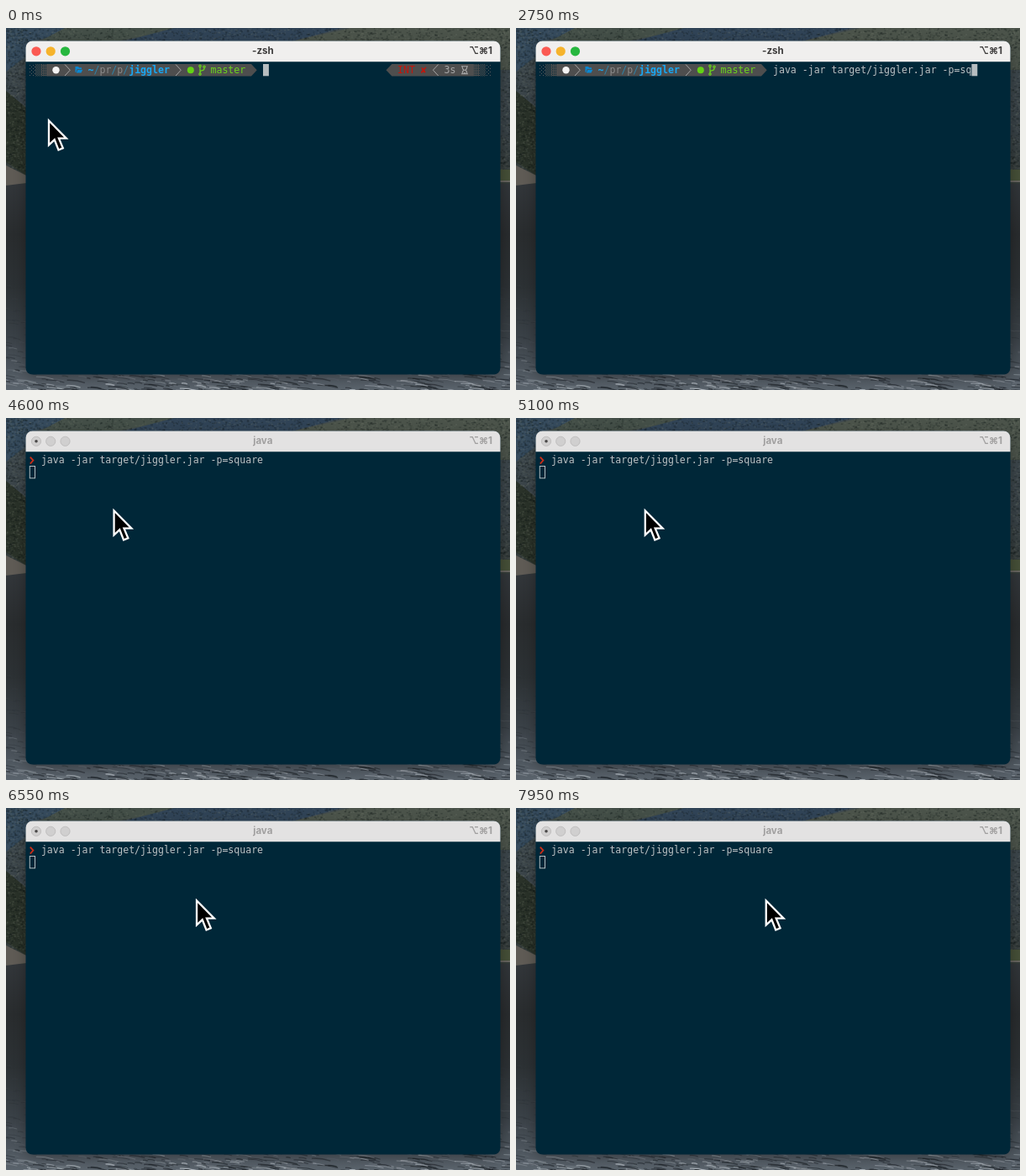
Write an HTML page with a canvas that moves like this. It is 600 by 432 pixels and loops after 8000 ms.

```html
<!DOCTYPE html>
<html lang="en">
<head>
<meta charset="utf-8">
<title>Terminal session</title>
<style>
  html, body { margin: 0; width: 100%; height: 100%; overflow: hidden; background: #2b3032; }
  canvas, svg { position: absolute; left: 0; top: 0; width: 600px; height: 432px; }
  .mono { font: 11.55px "DejaVu Sans Mono", monospace; white-space: pre; }
  .bold { font-weight: 700; }
  .title { font: 700 11.5px Inter, sans-serif; text-anchor: middle; }
  .keys { font: 700 11.5px Inter, "DejaVu Sans", sans-serif; text-anchor: end; }
  .bar { fill: #f0efee; }
  .title, .keys { fill: #3b3a3a; }
  .idle .bar { fill: #e3e2e2; }
  .idle .title, .idle .keys { fill: #a09f9f; }
  .idle .light { fill: #d0cfcf; stroke: #b9b8b8; stroke-width: .8; }
  .dot { display: none; fill: #4a4949; }
  .idle .dot { display: inline; }
  .thin { fill: none; stroke: #a3a3a3; stroke-width: 1; }
  .shadow { filter: blur(8px); }
</style>
</head>
<body>
<canvas id="lake" width="600" height="432"></canvas>
<svg viewBox="0 0 600 432">
  <defs>
    <pattern id="light" width="4" height="4" patternUnits="userSpaceOnUse">
      <path d="M0 0h1v1h-1zM2 2h1v1h-1z" fill="#5a5c5d"/>
    </pattern>
    <pattern id="medium" width="2" height="2" patternUnits="userSpaceOnUse">
      <path d="M0 0h1v1h-1zM1 1h1v1h-1z" fill="#4e4e4e"/>
    </pattern>
    <pattern id="dark" width="2" height="2" patternUnits="userSpaceOnUse">
      <path d="M0 0h2v1h-1v1h-1z" fill="#4e4e4e"/>
    </pattern>
  </defs>

  <g id="window">
    <rect class="shadow" x="24" y="22" width="565" height="394" rx="10" fill="#000" opacity=".32"/>
    <rect x="23.5" y="15.5" width="565" height="398" rx="8" fill="#002738"/>
    <path class="bar" d="M23.5 40.2V23.5a8 8 0 0 1 8-8h549a8 8 0 0 1 8 8V40.2z"/>
    <circle class="light" cx="36" cy="27.8" r="5.6" fill="#fb5a52"/>
    <circle class="light" cx="53.2" cy="27.8" r="5.6" fill="#f6b32c"/>
    <circle class="light" cx="70.5" cy="27.8" r="5.6" fill="#27b73f"/>
    <circle class="dot" cx="36" cy="27.8" r="1.8"/>
    <text id="title" class="title" x="305.8" y="31.2">-zsh</text>
    <text class="keys" x="579" y="31">⌥⌘1</text>
  </g>

  <g id="prompt">
    <rect x="28" y="43" width="7" height="14.5" fill="url(#light)"/>
    <rect x="35" y="43" width="7" height="14.5" fill="url(#medium)"/>
    <rect x="42" y="43" width="7" height="14.5" fill="url(#dark)"/>
    <path d="M49 43H292L298.7 50.2L292 57.5H49z" fill="#4e4e4e"/>
    <circle cx="59.5" cy="50.2" r="4.2" fill="#f4f4f4"/>
    <path class="thin" d="M70 43.5l6.3 6.7l-6.3 6.8M202 43.5l6.3 6.7l-6.3 6.8"/>
    <path d="M82.5 46h3.5l1 1.3h3v1.7h-5.2l-1.6 4h-.7zM85.3 49.8h6l-1.8 3.6h-5.7z" fill="#0b87d0"/>
    <g class="mono">
      <text x="97.5" y="53.7" fill="#18a8f5" class="bold">~</text>
      <text x="104.5" y="53.7" fill="#8b8b8b"><tspan fill="#2f82a8">/</tspan>pr<tspan fill="#2f82a8">/</tspan>p<tspan fill="#2f82a8">/</tspan></text>
      <text x="146.2" y="53.7" fill="#18a8f5" class="bold">jiggler</text>
      <text x="243.5" y="53.7" fill="#6bd61c">master</text>
    </g>
    <circle cx="219.8" cy="50.2" r="4" fill="#62d315"/>
    <g fill="none" stroke="#6bd61c" stroke-width="1.2">
      <path d="M231 46.6V54M236 47.3v1.2q0 1.8-2.4 2.2q-2.6.5-2.6 2.2"/>
      <circle cx="231" cy="45.4" r="1.2"/>
      <circle cx="236" cy="46.2" r="1.2"/>
      <circle cx="231" cy="55.1" r="1.2"/>
    </g>
  </g>

  <g id="status">
    <path d="M557.3 43H459.4L452.5 50.2L459.4 57.5H557.3z" fill="#4e4e4e"/>
    <rect x="557" y="43" width="7" height="14.5" fill="url(#dark)"/>
    <rect x="564" y="43" width="7" height="14.5" fill="url(#medium)"/>
    <rect x="571" y="43" width="7" height="14.5" fill="url(#light)"/>
    <text class="mono" x="466" y="53.7" fill="#c4150c">INT ✘</text>
    <path class="thin" d="M514.7 43.5l-6.3 6.7l6.3 6.8"/>
    <text class="mono" x="521.6" y="53.7" fill="#a6a6a6">3s</text>
    <path d="M542 45.8h8M542 54.8h8M543.3 46v1.6q0 1.4 2 2.7q-2 1.3-2 2.7v1.6M548.7 46v1.6q0 1.4-2 2.7q2 1.3 2 2.7v1.6M544.5 53.8h3" fill="none" stroke="#a6a6a6" stroke-width="1.1"/>
  </g>

  <path id="caret" d="M28.8 46.6l3.6 4l-3.6 4" fill="none" stroke="#cb2d18" stroke-width="1.8"/>
  <text id="command" class="mono" y="53.7" fill="#bcc1c3"></text>
  <rect id="cursor" height="14.3"/>
  <path id="pointer" d="M1.5 3V32L8.2 25.8L13 38L18.3 35.8L13.4 24.2H22.3z" fill="#000" stroke="#fff" stroke-width="2.3"/>
</svg>

<script>
const LOOP = 8000;
const CELL = 6.953;
const COMMAND = "java -jar target/jiggler.jar -p=square";
const HIDE_POINTER = 100, RUN = 3180, BLUR = 3450;
// [typed characters, time in ms]
const TYPING = [[1, 100], [19, 1420], [32, 2520], [33, 2650], [38, 3080]];

const $ = id => document.getElementById(id);
const show = (id, on) => $(id).style.display = on ? "inline" : "none";

function typedAt(t) {
  if (t < TYPING[0][1]) return 0;
  for (let i = 1; i < TYPING.length; i++) {
    const [n0, t0] = TYPING[i - 1], [n1, t1] = TYPING[i];
    if (t < t1) return Math.floor(n0 + (n1 - n0) * (t - t0) / (t1 - t0));
  }
  return COMMAND.length;
}

function render(t) {
  const running = t >= RUN, idle = t >= BLUR, typed = typedAt(t);
  $("window").setAttribute("class", idle ? "idle" : "");
  $("title").textContent = running ? "java" : "-zsh";
  show("prompt", !running);
  show("status", !running && typed < 21);
  show("caret", running);

  $("command").textContent = COMMAND.slice(0, typed);
  $("command").setAttribute("x", running ? 41.9 : 306);

  const cursor = $("cursor");
  cursor.setAttribute("x", running ? 28.3 : 306 + typed * CELL);
  cursor.setAttribute("y", running ? 57.5 : 43);
  cursor.setAttribute("width", idle ? 6.2 : 6.9);
  cursor.setAttribute("fill", idle ? "none" : "#b7bdc0");
  cursor.setAttribute("stroke", idle ? "#b7bdc0" : "none");

  show("pointer", t < HIDE_POINTER || idle);
  const x = idle ? 127 + (t - 4600) * 0.0505 : 49.5;
  $("pointer").setAttribute("transform", `translate(${x.toFixed(2)} 107.5)`);
}

function paintLake() {
  const g = $("lake").getContext("2d");
  let seed = 7;
  const rand = () => (seed = seed * 16807 % 2147483647) / 2147483647;
  const fade = (y0, y1, ...colors) => {
    const f = g.createLinearGradient(0, y0, 0, y1);
    colors.forEach((c, i) => f.addColorStop(i / (colors.length - 1), c));
    return f;
  };
  const shape = (color, ...points) => {
    g.fillStyle = color;
    g.beginPath();
    points.forEach(p => g.lineTo(...p));
    g.fill();
  };

  // hills
  g.fillStyle = fade(0, 186, "#414b4e", "#3c464b", "#384146", "#343b38");
  g.fillRect(0, 0, 600, 186);
  shape("#354a5c", [0, 0], [100, 0], [30, 16], [24, 34], [0, 52]);
  shape("#434e47", [70, 0], [215, 0], [130, 16], [40, 16]);
  shape("#304356", [200, 0], [400, 0], [340, 16], [140, 16]);
  shape("#4b534a", [340, 16], [410, 0], [600, 0], [600, 50], [588, 50]);
  shape("#2a3229", [0, 75], [24, 95], [24, 176], [0, 160]);

  for (let i = 0; i < 2400; i++) {
    const top = i % 2;
    const x = top ? rand() * 600 : (rand() < .7 ? rand() * 24 : 588 + rand() * 12);
    const y = top ? rand() * 18 : rand() * 170;
    g.fillStyle = rand() < .55 ? "rgba(13,21,20,.26)" : "rgba(125,137,120,.14)";
    g.fillRect(x, y, 1 + rand() * 2, 1 + rand());
  }

  // shore and water
  g.fillStyle = fade(184, 432, "#32363a", "#292c2e", "#2c3134", "#3a4147", "#5a636c");
  g.fillRect(0, 186, 600, 246);
  shape("#5f5b55", [0, 164], [24, 176], [24, 185], [0, 188]);
  g.fillStyle = "#465038";
  g.fillRect(588, 169, 12, 13);
  g.fillStyle = "#66645e";
  g.fillRect(588, 182, 12, 2);

  // ripples grow longer and brighter towards the viewer
  for (let i = 0; i < 1100; i++) {
    const near = 1 - rand() ** 1.6;
    const x = rand() * 640 - 40, y = 300 + 132 * near;
    const length = 4 + 22 * near * rand();
    g.strokeStyle = rand() < .45
      ? `rgba(200,207,214,${.03 + .75 * near ** 3 * rand()})`
      : `rgba(22,27,32,${.08 + .5 * near ** 2})`;
    g.lineWidth = .6 + near * rand();
    g.beginPath();
    g.moveTo(x, y);
    g.quadraticCurveTo(x + length / 2, y - .5, x + length, y + length * .14);
    g.stroke();
  }
}

paintLake();
function frame() {
  render(performance.now() % LOOP);
  requestAnimationFrame(frame);
}
frame();
</script>
</body>
</html>
```
